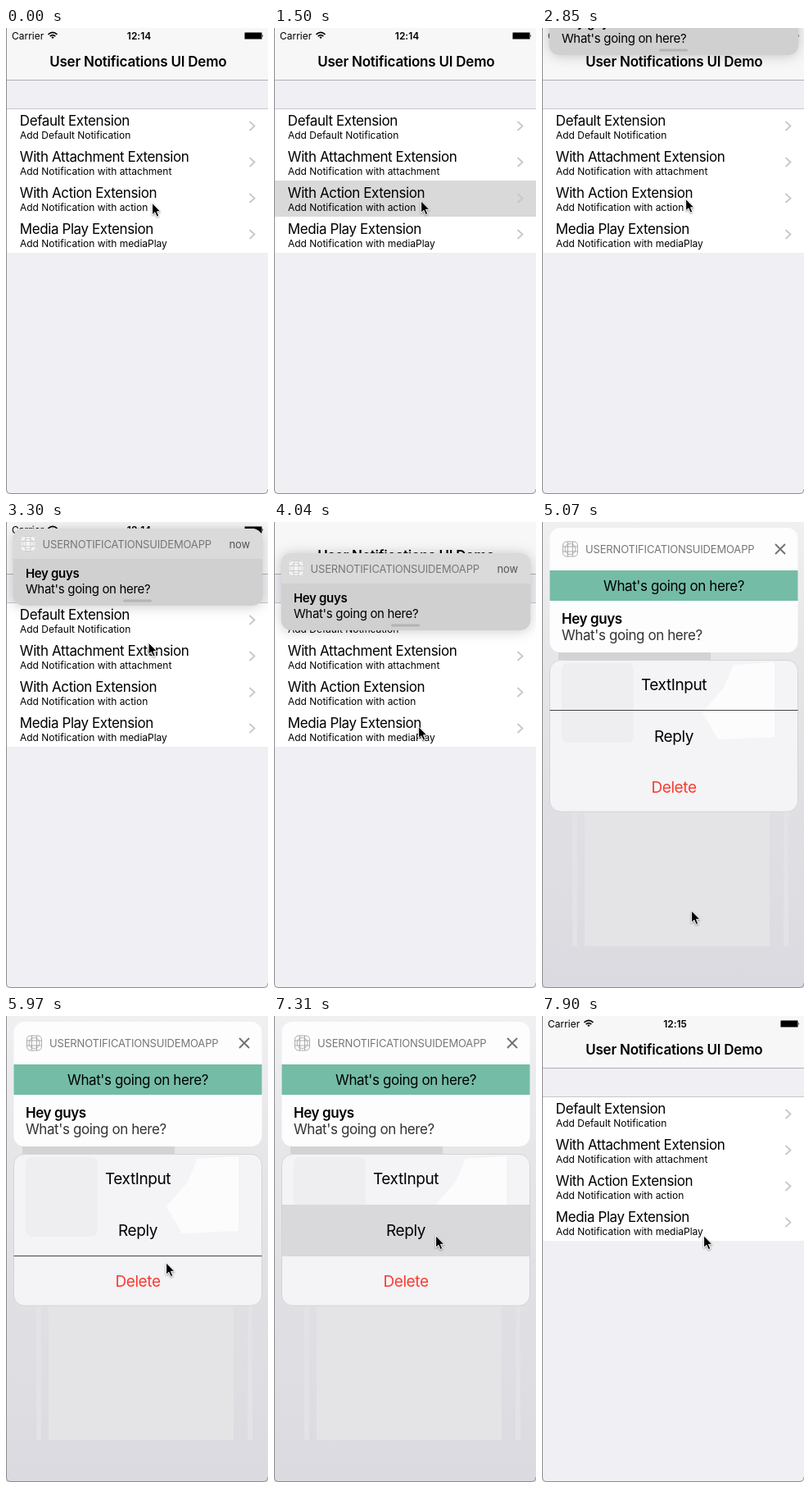
These frames come from a looping animation (320x568 px, 8000 ms). An HTML page:

```html
<!DOCTYPE html>
<html lang="en">
<head>
<meta charset="utf-8">
<title>Notification demo</title>
<style>
  html, body { margin: 0; width: 100%; height: 100%; overflow: hidden; background: #efeff4; }
  svg { display: block; width: 100%; height: 100%; }
  text { font: 17px Inter, Roboto, sans-serif; letter-spacing: -.41px; }
  .semibold { font-weight: 600; }
  .mid { text-anchor: middle; }
  .title { letter-spacing: -.22px; }
  .small { font-size: 12px; letter-spacing: -.02px; }
  .head { font-size: 13px; letter-spacing: -.17px; fill: #777; }
  .message { font-size: 15px; letter-spacing: -.32px; }
  .action { font-size: 19px; text-anchor: middle; }
  #banner { filter: drop-shadow(0 1px 8px #0003); }
  #cursor { filter: drop-shadow(0 1px 1px #0006); }
</style>
</head>
<body>
<svg viewBox="0 0 320 568">
  <defs>
    <clipPath id="bannerClip"><rect width="305" height="94" rx="13"/></clipPath>
    <clipPath id="cardClip"><rect x="9.5" y="7" width="303" height="152" rx="13"/></clipPath>
    <clipPath id="actionClip"><rect x="9.5" y="168.5" width="303" height="184.5" rx="13"/></clipPath>
    <linearGradient id="haze" x2="0" y2="1">
      <stop stop-color="#f0f0f2"/><stop offset=".3" stop-color="#e6e6e9"/>
      <stop offset=".6" stop-color="#e0e0e4"/><stop offset="1" stop-color="#dadae0"/>
    </linearGradient>
    <g id="appIcon" fill="none" stroke-width=".8">
      <rect x=".5" y=".5" width="18" height="18" rx="4.5"/>
      <path d="M6.5 .5V18.5M12.5 .5V18.5M.5 6.5H18.5M.5 12.5H18.5"/>
      <circle cx="9.5" cy="9.5" r="6.5"/>
    </g>
  </defs>

  <rect width="320" height="568" fill="#efeff4"/>
  <rect width="320" height="63" fill="#f7f7f8"/>
  <rect y="63" width="320" height="1" fill="#b2b2b4"/>
  <text class="title semibold mid" x="161.3" y="47">User Notifications UI Demo</text>
  <g id="status">
    <text class="small" x="7" y="13.5">Carrier</text>
    <g fill="none" stroke="#000" stroke-width="1.7">
      <path d="M51.5 7.8Q57 3 62.5 7.8M53.7 10.1Q57 7.2 60.3 10.1"/>
      <path d="M55.4 11.2Q57 9.8 58.6 11.2L57 13.2Z" fill="#000" stroke="none"/>
    </g>
    <text id="clock" class="small semibold mid" x="162.5" y="13.5"></text>
    <rect x="291" y="5" width="22" height="9" rx="1.5" fill="#777"/>
    <rect x="292" y="6" width="20" height="7" rx=".5"/>
    <path d="M313.3 7.7Q315 9.5 313.3 11.3Z"/>
  </g>
  <rect y="98" width="320" height="176" fill="#fff"/>
  <rect y="98" width="320" height="1" fill="#c8c7cc"/>
  <rect id="rowGlow" y="186" width="320" height="44" fill="#d9d9d9"/>
  <g id="rows"></g>

  <g id="banner">
    <g clip-path="url(#bannerClip)">
      <rect width="305" height="94" fill="#d0d0d0"/>
      <rect width="305" height="37" fill="#dadada"/>
    </g>
    <rect x="9" y="9" width="19" height="19" rx="4.5" fill="#f4f4f4"/>
    <use href="#appIcon" x="9" y="9" stroke="#c6c6c6"/>
    <text class="head" x="36" y="24">USERNOTIFICATIONSUIDEMOAPP</text>
    <text class="head" x="264" y="24" style="fill:#555">now</text>
    <text class="message semibold" x="15.4" y="59.5">Hey guys</text>
    <text class="message" x="15.4" y="78.5">What's going on here?</text>
    <rect x="134.5" y="86.5" width="35" height="3" rx="1.5" fill="#b4b4b4"/>
  </g>

  <g id="expanded">
    <rect width="320" height="568" fill="url(#haze)"/>
    <rect x="52" y="300" width="226" height="217" fill="#e4e4e6"/>
    <path d="M40 280V517M298 280V517" stroke="#e3e3e7" stroke-width="6"/>
    <rect x="20" y="140" width="186" height="28" fill="#d3d3d5"/>
    <g id="cards">
      <g clip-path="url(#cardClip)">
        <rect x="9" y="7" width="304" height="152" fill="#fdfdfd"/>
        <rect x="9" y="59" width="304" height="37" fill="#74bca6"/>
      </g>
      <use href="#appIcon" x="25" y="23.5" stroke="#999"/>
      <text class="head" x="53" y="38">USERNOTIFICATIONSUIDEMOAPP</text>
      <path d="M285 27L297 39M297 27L285 39" stroke="#707070" stroke-width="1.8"/>
      <text class="mid" x="161" y="83.5">What's going on here?</text>
      <text class="semibold" x="24" y="123.5">Hey guys</text>
      <text x="24" y="144" fill="#333">What's going on here?</text>

      <g clip-path="url(#actionClip)">
        <rect x="9" y="168" width="304" height="186" fill="#f4f4f6"/>
        <rect x="24" y="172" width="88" height="97" rx="8" fill="#eeeef0"/>
        <path d="M196 232L222 202L234 174L284 171V262L215 265Z" fill="#fcfcfd"/>
        <rect id="replyGlow" x="9" y="230" width="304" height="63" fill="#d9d9dc"/>
      </g>
      <rect x="9.5" y="168.5" width="303" height="184.5" rx="13" fill="none" stroke="#cfcfd2" stroke-width=".8"/>
      <text class="action" x="161" y="205">TextInput</text>
      <text class="action" x="161" y="267.5">Reply</text>
      <text class="action" x="161" y="330" fill="#fa3b30">Delete</text>
      <rect id="divider" x="9.5" width="303" height="1" fill="#444"/>
    </g>
  </g>

  <path d="M.5 0V562Q.5 567.5 6 567.5H314Q319.5 567.5 320 562" fill="none" stroke="#8c8c8f"/>
  <path id="cursor" d="M.6 .8V15.3L3.9 12.2L6.2 17.6L8.8 16.5L6.5 11.3H10.9Z" stroke="#fff" stroke-width="1"/>
</svg>
<script>
const LOOP = 8000, STEP = 149; // the picture is renewed about every 149 ms
const $ = id => document.getElementById(id);

const rows = [
  ["Default Extension", "Add Default Notification"],
  ["With Attachment Extension", "Add Notification with attachment"],
  ["With Action Extension", "Add Notification with action"],
  ["Media Play Extension", "Add Notification with mediaPlay"]
];
$("rows").innerHTML = rows.map(([title, detail], i) => `
  <g transform="translate(0 ${98 + 44 * i})">
    <text x="16.8" y="21">${title}</text>
    <text class="small" x="17" y="37">${detail}</text>
    <path d="M297.5 16L303.5 21.5L297.5 27" fill="none" stroke="#c7c7cc" stroke-width="1.8"/>
  </g>`).join("");

// Each track is a list of [step, ...values], joined by straight lines.
const cursorTrack = [
  [0, 178, 212.5], [3, 178, 212], [4, 179, 210], [16, 179, 210], [17, 175, 207.5],
  [20, 175, 207.5], [24, 172, 85], [25, 172, 85], [26, 174, 170], [27, 176, 248.5],
  [29, 181, 420], [30, 182, 473], [37, 182, 473], [38, 187, 420], [39, 192, 350],
  [40, 195, 300], [42, 197, 267]
];
const bannerTrack = [[18, -110], [19, -61], [20, -14], [21, 4], [22, 8], [25, 8], [26, 22], [27, 38], [28, 30]];
const rowGlowTrack = [[9, 0], [10, 1], [16, 0]];
const expandedTrack = [[27, 0], [28, .6], [29, 1], [50, 1], [51, .6], [52, .15], [53, 0]];
const scaleTrack = [[27, .95], [28, .97], [29, 1.01], [30, 1.02], [33, 1], [50, 1], [52, .95]];

function at(track, step) {
  const next = track.findIndex(key => key[0] > step);
  if (next === 0) return track[0].slice(1);
  if (next < 0) return track.at(-1).slice(1);
  const a = track[next - 1], b = track[next];
  const part = (step - a[0]) / (b[0] - a[0]);
  return a.slice(1).map((value, i) => value + (b[i + 1] - value) * part);
}

const move = (id, transform) => $(id).setAttribute("transform", transform);
const fade = (id, opacity) => $(id).setAttribute("opacity", opacity);
const show = (id, visible) => fade(id, visible ? 1 : 0);

function draw(now) {
  const step = Math.floor(now % LOOP / STEP);
  move("cursor", `translate(${at(cursorTrack, step)})`);
  move("banner", `translate(8.5 ${at(bannerTrack, step)})`);
  show("banner", step >= 19 && step < 29);
  fade("rowGlow", at(rowGlowTrack, step));
  fade("expanded", at(expandedTrack, step));
  move("cards", `translate(161 164) scale(${at(scaleTrack, step)}) translate(-161 -164)`);
  $("divider").setAttribute("y", step < 36 ? 229 : 292);
  show("divider", step < 49);
  show("replyGlow", step >= 44);
  show("status", step < 26 || step > 51);
  $("clock").textContent = step < 30 ? "12:14" : "12:15";
  requestAnimationFrame(draw);
}
requestAnimationFrame(draw);
</script>
</body>
</html>
```
